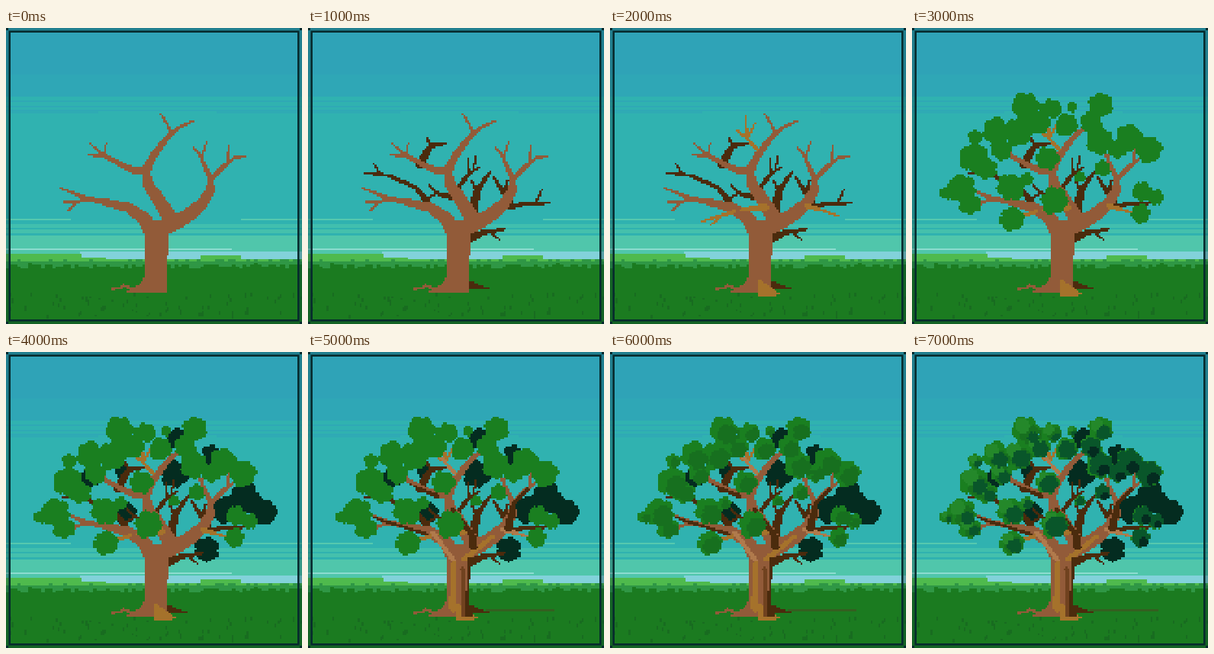
An HTML page with a canvas that plays this animation: 388 by 388 pixels, repeating every 8 s.

```html
<!DOCTYPE html>
<html lang="en">
<head>
<meta charset="utf-8">
<title>Pixel tree</title>
<style>
html, body { margin: 0; width: 100%; height: 100%; overflow: hidden; background: #2fb2b0; }
canvas { display: block; width: 388px; height: 388px; }
</style>
</head>
<body>
<canvas id="stage" width="388" height="388"></canvas>
<script>
const SIZE = 388, CELLS = 160, CELL = SIZE / CELLS, STEP_MS = 1000, STEPS = 8;
const BARK = '#925b39', DEEP = '#4b2b0d', GOLD = '#a5722b', TAN = '#b07a4c';
const LEAF = '#1a7f20', SOFT = '#17701f', SHADE = '#09562a', NIGHT = '#042c20', BRIGHT = '#24882a';

// Leaf clumps: x, y, radius.
const leftClumps = [
  [150, 103, 18], [183, 106, 13], [202, 127, 14], [110, 136, 17], [83, 143, 9], [139, 135, 18],
  [165, 124, 15], [82, 170, 19], [117, 160, 14], [97, 184, 14], [65, 210, 18], [45, 216, 8],
  [76, 230, 14], [128, 208, 18], [150, 198, 8], [177, 171, 15], [187, 226, 18], [130, 250, 15]
];
const rightClumps = [
  [210, 104, 7], [247, 101, 15], [234, 124, 14], [247, 148, 17], [285, 144, 17], [270, 158, 13],
  [311, 159, 17], [250, 184, 11], [220, 195, 7], [303, 214, 13], [320, 222, 10], [300, 244, 12]
];
const rearClumps = [
  [226, 113, 14], [269, 134, 12], [221, 160, 18], [153, 156, 10], [110, 166, 12],
  [154, 210, 15], [313, 193, 20], [338, 209, 16], [287, 207, 17], [264, 259, 16]
];

let grid;

function seeded(seed) {
  return () => (seed = (seed * 16807) % 2147483647) / 2147483647;
}

function paint(color, x0, y0, x1, y1, inside, only) {
  const lo = v => Math.max(0, Math.floor(v / CELL));
  const hi = v => Math.min(CELLS - 1, Math.ceil(v / CELL));
  for (let j = lo(y0); j <= hi(y1); j++) {
    for (let i = lo(x0); i <= hi(x1); i++) {
      const k = j * CELLS + i;
      if (only && !only.includes(grid[k])) continue;
      if (inside((i + .5) * CELL, (j + .5) * CELL)) grid[k] = color;
    }
  }
}

function rect(color, x, y, w, h) {
  paint(color, x, y, x + w, y + h, (px, py) => px >= x && px < x + w && py >= y && py < y + h);
}

function disc(color, x, y, r, only) {
  paint(color, x - r, y - r, x + r, y + r, (px, py) => Math.hypot(px - x, py - y) <= r, only);
}

function clump(color, x, y, r, only) {
  const random = seeded(x * 131 + y);
  const turn = random() * 6;
  disc(color, x, y, r * .8, only);
  for (let n = 0; n < 6; n++) {
    const a = turn + n * Math.PI / 3;
    disc(color, x + Math.cos(a) * r * .62, y + Math.sin(a) * r * .62, r * (.38 + random() * .16), only);
  }
}

// A stroke through x, y pairs whose radius runs from r0 to r1.
function limb(color, r0, r1, path, only) {
  const parts = path.length / 2 - 1;
  const radius = n => r0 + (r1 - r0) * n / parts;
  for (let n = 0; n < parts; n++) {
    const [ax, ay, bx, by] = path.slice(2 * n, 2 * n + 4);
    const ar = radius(n), br = radius(n + 1), r = Math.max(ar, br);
    const dx = bx - ax, dy = by - ay, len2 = dx * dx + dy * dy;
    paint(color, Math.min(ax, bx) - r, Math.min(ay, by) - r, Math.max(ax, bx) + r, Math.max(ay, by) + r,
      (x, y) => {
        const t = Math.max(0, Math.min(1, ((x - ax) * dx + (y - ay) * dy) / len2));
        return y < 347 && Math.hypot(x - ax - t * dx, y - ay - t * dy) <= ar + t * (br - ar);
      }, only);
  }
}

function landscape() {
  const random = seeded(71);
  const band = (color, y, h, x = 0, w = SIZE) => rect(color, x, y, w, h);
  band('#2fa3b7', 0, 60);
  band('#2fa7b6', 60, 30);
  band('#30b2b0', 90, 220);
  for (const y of [94, 101, 106]) band('#2fa9b5', y, 2.5);
  band('#2fabb4', 110, 2.5, 0, 122);
  band('#2fabb4', 110, 2.5, 277);
  band('#55c8ae', 250, 2.5, 0, 86);
  band('#55c8ae', 250, 2.5, 308);
  band('#41bfae', 258, 4);
  band('#45c0ac', 265, 4);
  band('#50c6ab', 272, 34);
  band('#8cdccf', 288, 2.5, 0, 297);
  band('#82d2da', 294, 9, 96);
  band('#4fba4d', 303, 6);
  band('#4fba4d', 297, 8, 0, 100);
  band('#4fba4d', 300, 8, 100, 30);
  band('#4fba4d', 299, 8, 255, 52);
  band('#2f9745', 306, 12);
  band('#1b7b20', 316, 72);
  for (let x = 0; x < SIZE; x += 5) {
    const h = random() * 7;
    band('#1b7b20', 316 - h, h + 1, x, 5);
    if (random() < .3) band('#2f9745', 304, 4, x, 5);
  }
  for (let n = 0; n < 65; n++) {
    band('#186c20', 346 + random() * 30, 3 + random() * 4, random() * SIZE, 2.5);
  }
}

function mainWood() {
  const draw = (r0, r1, ...path) => limb(BARK, r0, r1, path);
  draw(14, 15, 197, 345, 198, 268);
  draw(11, 4.5, 195, 273, 180, 249, 160, 235, 130, 229);
  draw(5, 1.3, 135, 229, 108, 224, 72, 210);
  draw(3, 1.3, 108, 224, 91, 228, 75, 228);
  draw(1.8, 1.3, 91, 229, 82, 239);
  draw(11, 4, 200, 266, 237, 247, 257, 230, 268, 213, 268, 198);
  draw(4, 1.2, 268, 198, 287, 180, 300, 170, 313, 169);
  draw(1.8, 1.2, 290, 178, 292, 154);
  draw(3.5, 1.4, 268, 198, 255, 167, 245, 155);
  draw(2, 1.2, 257, 168, 263, 150);
  draw(10, 5, 218, 254, 198, 222, 185, 203, 184, 185);
  draw(6, 1.4, 184, 185, 195, 165, 210, 145, 225, 131, 245, 122);
  draw(2.5, 1.3, 216, 137, 211, 125, 203, 113);
  draw(6, 1.3, 184, 187, 165, 186, 130, 168, 107, 166);
  draw(2, 1.2, 130, 168, 109, 151);
  draw(1.8, 1.2, 130, 168, 131, 151);
  draw(1.5, 2, 139, 342, 149, 341, 154, 337, 165, 341);
  // Flared root on the left of the trunk.
  paint(BARK, 160, 310, 198, 346, (x, y) => y < 346 && x > 184 - 24 * ((y - 310) / 34) ** 3);
}

function rearWood() {
  const draw = (r0, r1, ...path) => limb(DEEP, r0, r1, path);
  draw(4, 1.4, 156, 227, 141, 209, 105, 193, 75, 190);
  draw(2, 1.3, 95, 192, 87, 179);
  draw(6, 1.3, 147, 178, 161, 154, 180, 152);
  draw(2.5, 1.4, 161, 155, 155, 143);
  draw(4, 1.4, 191, 222, 171, 218, 158, 206);
  draw(2, 1.5, 168, 217, 160, 222);
  draw(3.5, 1.2, 193, 214, 211, 191, 224, 183);
  draw(1.6, 1.2, 211, 190, 210, 170);
  draw(1.6, 1.2, 217, 186, 220, 168);
  draw(7, 1.5, 216, 242, 221, 214, 240, 187);
  draw(3, 1.4, 221, 214, 215, 200);
  draw(5, 1.5, 264, 228, 243, 195);
  draw(3, 1.3, 258, 216, 262, 200);
  draw(3.5, 1.4, 265, 235, 285, 230, 316, 230);
  draw(2, 1.3, 299, 228, 306, 212);
  draw(6, 1.5, 210, 277, 230, 268, 258, 264);
  draw(2, 1.3, 240, 267, 250, 277);
  draw(5, 1, 210, 336, 238, 342);
}

function goldWood() {
  const draw = (r0, r1, ...path) => limb(GOLD, r0, r1, path);
  draw(3, 1.2, 193, 159, 180, 145, 165, 133);
  draw(1.8, 1.2, 180, 145, 178, 114);
  draw(1.7, 1.2, 182, 141, 190, 125);
  draw(5.5, 1.5, 203, 235, 172, 238);
  draw(3, 1.3, 162, 241, 119, 254);
  draw(1.8, 1.2, 148, 245, 133, 258);
  draw(3.5, 1.2, 257, 233, 275, 238, 301, 247);
  paint(GOLD, 192, 331, 214, 348, (x, y) => x > 193 && y > 331 + (x - 199) * .7);
  rect(GOLD, 203, 346, 20, 2.5);
}

function woodShading() {
  const draw = (color, r0, r1, ...path) => limb(color, r0, r1, path, [BARK, GOLD]);
  draw(DEEP, 4, 5, 213, 272, 211, 344);
  draw('#70421f', 3, 3, 203, 285, 205, 344);
  draw(GOLD, 4, 5, 191, 278, 190, 336);
  draw(TAN, 3, 3, 164, 237, 190, 272);
  draw(GOLD, 4, 2.5, 206, 271, 242, 242);
  draw(DEEP, 5, 3, 217, 255, 216, 241, 190, 207);
  draw(DEEP, 5, 3, 263, 230, 270, 200, 287, 181);
  draw(TAN, 3, 2, 255, 233, 296, 242);
  draw(TAN, 3, 2, 192, 160, 174, 137);
  draw(DEEP, 2, 2, 76, 214, 156, 239);
  draw(DEEP, 3, 3, 130, 174, 170, 189);
  rect('#345f20', 232, 336, 91, 2.5);
}

// Light falls from the upper left, so clumps darken towards the right.
function leafShading(step) {
  const clumps = [...leftClumps, ...rightClumps];
  for (const [x, y, r] of clumps) clump(SOFT, x + r * .3, y + r * .3, r * .75, [LEAF]);
  if (step < 7) return;
  for (const [x, y, r] of clumps) {
    const depth = Math.max(0, Math.min(1, (x - 60) / 220 + (y > 112 ? .1 : -.5)));
    const shift = r * .5 * (1 - depth);
    clump(SHADE, x + shift, y + shift, r * (.4 + .55 * depth), [LEAF, SOFT]);
    if (x > 230 && y > 120) disc(NIGHT, x + r * .3, y + r * .45, r * .5, [SHADE]);
    if (x < 265) disc(BRIGHT, x - r * .3, y - r * .35, r * .55, [LEAF, SOFT]);
  }
}

function tree(step) {
  const foliage = (color, list) => list.forEach(c => clump(color, ...c));
  if (step >= 4) foliage(NIGHT, rearClumps);
  if (step >= 1) rearWood();
  mainWood();
  if (step >= 2) goldWood();
  if (step >= 5) woodShading();
  if (step >= 3) foliage(LEAF, [...leftClumps, ...rightClumps]);
  if (step >= 6) leafShading(step);
}

function border(g) {
  g.lineWidth = 4;
  g.strokeStyle = 'rgba(0,45,50,.3)';
  g.strokeRect(2, 2, SIZE - 4, SIZE - 4);
  g.lineWidth = 2.5;
  g.strokeStyle = g.fillStyle = '#072a2d';
  g.strokeRect(4.75, 4.75, SIZE - 9.5, SIZE - 9.5);
  for (const x of [0, 385]) for (const y of [0, 385]) g.fillRect(x, y, 3, 3);
}

function render(step) {
  grid = new Array(CELLS * CELLS);
  landscape();
  tree(step);
  const picture = document.createElement('canvas');
  picture.width = picture.height = SIZE;
  const g = picture.getContext('2d');
  const edge = n => Math.round(n * CELL);
  grid.forEach((color, k) => {
    const i = k % CELLS, j = Math.floor(k / CELLS);
    g.fillStyle = color;
    g.fillRect(edge(i), edge(j), edge(i + 1) - edge(i), edge(j + 1) - edge(j));
  });
  border(g);
  return picture;
}

const pictures = Array.from({ length: STEPS }, (_, step) => render(step));
const stage = document.getElementById('stage').getContext('2d');
const start = performance.now();

function draw() {
  const step = Math.floor(Math.max(0, performance.now() - start) / STEP_MS) % STEPS;
  stage.drawImage(pictures[step], 0, 0);
  requestAnimationFrame(draw);
}
draw();
</script>
</body>
</html>
```
